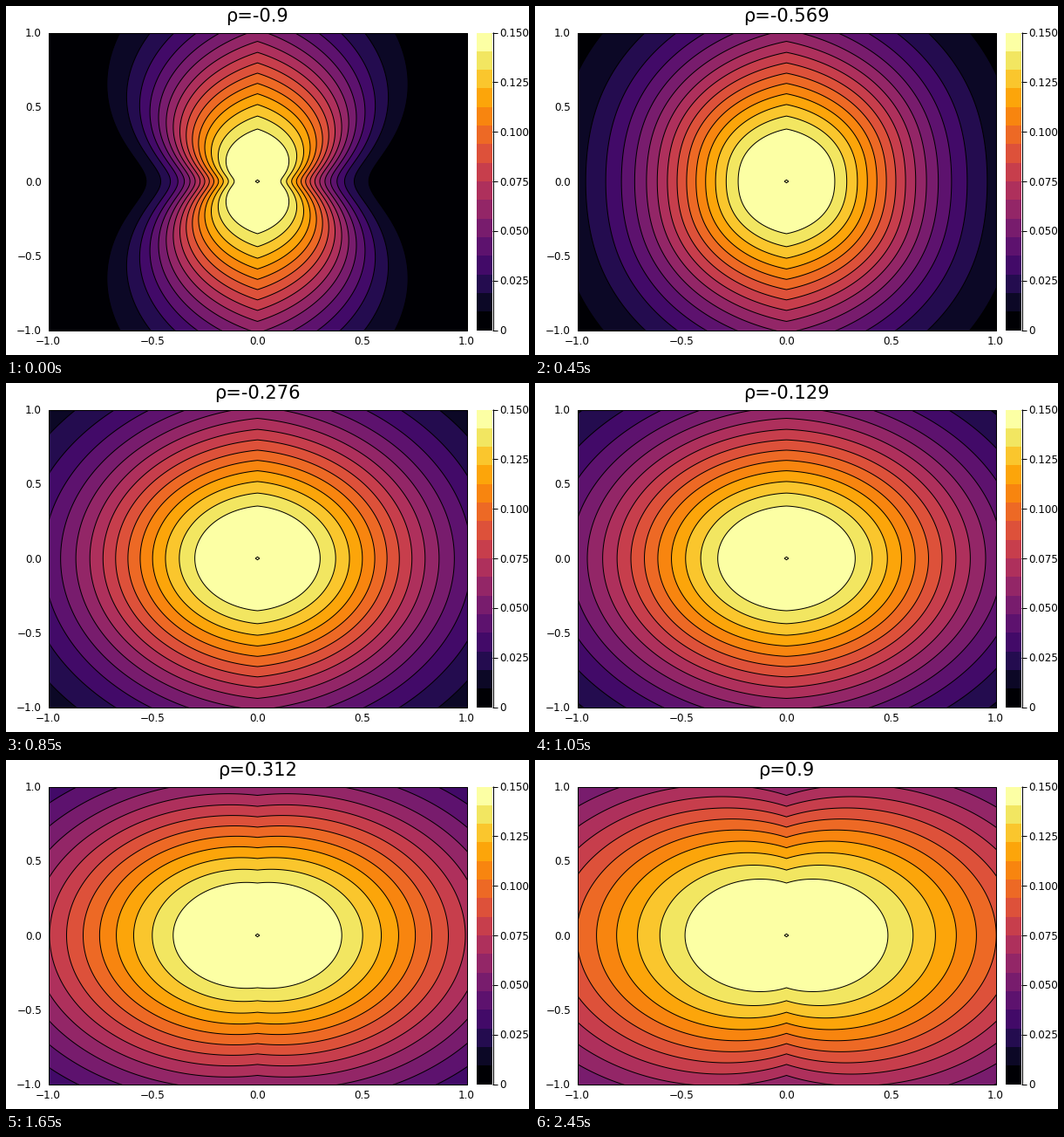
Recreate the animation shown at these times as a matplotlib script. Size 600x400 px, loop 2500 ms.

```python
import numpy as np
import matplotlib
import matplotlib.pyplot as plt
from matplotlib.animation import FuncAnimation
from matplotlib.patches import Polygon, Rectangle

W, H, DPI = 600, 400, 100
FRAMES, INTERVAL = 50, 50
BANDS, Z_MAX = 16, 0.15
LEFT, RIGHT, TOP, BOTTOM = 48.5, 528.5, 30.5, 371.5
CX, CY = (LEFT + RIGHT) / 2, (TOP + BOTTOM) / 2
SX, SY = (RIGHT - LEFT) / 2, (BOTTOM - TOP) / 2
BAR_LEFT, BAR_RIGHT = 540, 558

plt.rcParams["font.family"] = "DejaVu Sans"


def pt(px):
    return px * 72 / DPI


LINE = pt(1)
cmap = matplotlib.colormaps["inferno"]
colors = [cmap(i / (BANDS - 1)) for i in range(BANDS)]

fig = plt.figure(figsize=(W / DPI, H / DPI), dpi=DPI, facecolor="white")
ax = fig.add_axes([0, 0, 1, 1])
ax.set_xlim(0, W)
ax.set_ylim(H, 0)
ax.axis("off")


def label(x, y, text, size=12, ha="center"):
    return ax.text(x, y, text, fontsize=pt(size), ha=ha, va="baseline")


def stroke(xs, ys):
    ax.plot(xs, ys, color="black", lw=LINE, solid_capstyle="butt", zorder=6)


# Density exp(-r^2 / (1 + rho |cos t|)) / 2 pi: every contour is one shape, scaled.
levels = Z_MAX * np.arange(1, BANDS) / BANDS
radii = np.sqrt(-np.log(2 * np.pi * levels))
theta = np.linspace(0, 2 * np.pi, 721)


def contour(radius, rho):
    r = radius * np.sqrt(1 + rho * np.abs(np.cos(theta)))
    return np.column_stack([CX + SX * r * np.cos(theta),
                            CY - SY * r * np.sin(theta)])


frame = Rectangle((LEFT, TOP), RIGHT - LEFT, BOTTOM - TOP, fc=colors[0], lw=0)
ax.add_patch(frame)
rings = []
for k, radius in enumerate(radii):
    ring = Polygon(contour(radius, 0), fc=colors[k + 1], ec="black",
                   lw=LINE, zorder=2 + k * 0.1)
    ax.add_patch(ring)
    ring.set_clip_path(frame)
    rings.append(ring)

# The density is undefined at the origin, which leaves a tiny hole.
hole = 0.01
ax.add_patch(Polygon([(CX - hole * SX, CY), (CX, CY - hole * SY),
                      (CX + hole * SX, CY), (CX, CY + hole * SY)],
                     fc=colors[-1], ec="black", lw=LINE, zorder=5))

stroke([LEFT, RIGHT, RIGHT, LEFT, LEFT], [TOP, TOP, BOTTOM, BOTTOM, TOP])
for v in np.linspace(-1, 1, 5):
    text = f"{v:.1f}".replace("-", "\u2212")
    label(CX + SX * v, 387.5, text)
    label(41, CY - SY * v + 4.5, text, ha="right")

band = (BOTTOM - TOP) / BANDS
for k, color in enumerate(colors):
    ax.add_patch(Rectangle((BAR_LEFT, BOTTOM - (k + 1) * band),
                           BAR_RIGHT - BAR_LEFT, band,
                           fc=color, lw=0, antialiased=False))
stroke([BAR_RIGHT + 0.5] * 2, [TOP - 0.5, BOTTOM + 0.5])
for k in range(7):
    y = BOTTOM - (BOTTOM - TOP) * k / 6
    stroke([BAR_RIGHT, 564], [y, y])
    label(566.5, y + 4.5, f"{0.025 * k:.3f}" if k else "0", ha="left")

title = label(CX, 18.5, "", size=21)


def draw(i):
    rho = -0.9 + 1.8 * i / (FRAMES - 1)
    title.set_text(f"ρ={round(rho, 3)}")
    for ring, radius in zip(rings, radii):
        ring.set_xy(contour(radius, rho))
    return [title, *rings]


anim = FuncAnimation(fig, draw, frames=FRAMES, interval=INTERVAL,
                     repeat=True, repeat_delay=0, blit=False)
plt.show()
```
